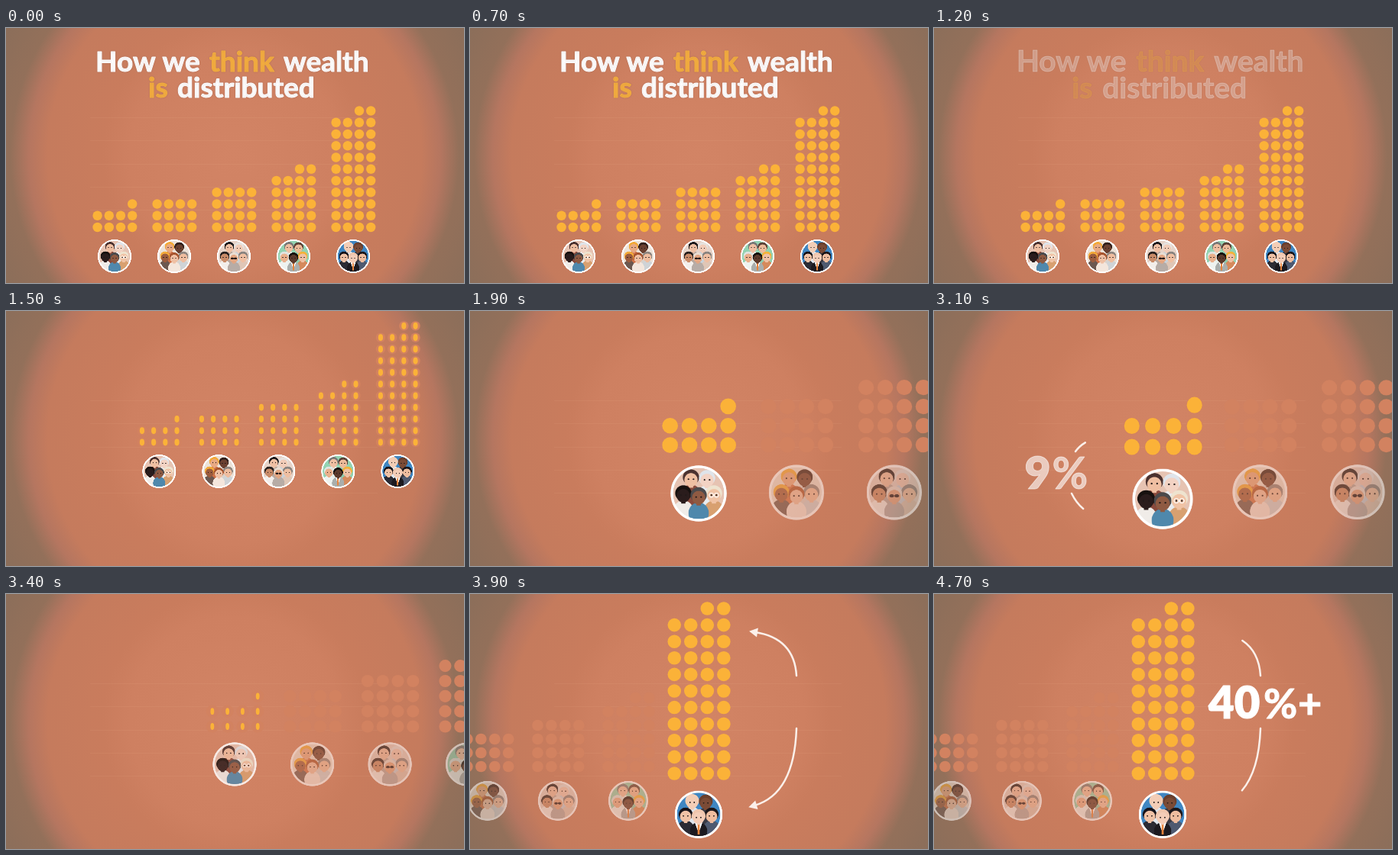
Write an HTML page with a canvas that moves like this. It is 599 px wide and 334 px high and loops after 4.8 s.

```html
<!DOCTYPE html>
<html lang="en">
<head>
<meta charset="utf-8">
<title>How we think wealth is distributed</title>
<style>
html, body { margin: 0; width: 100%; height: 100%; overflow: hidden; background: #8c6f5b; }
canvas { display: block; }
</style>
</head>
<body>
<canvas id="stage" width="599" height="334"></canvas>
<script>
const W = 599, H = 334, LOOP = 4800, STEP = 100;
const CX = 299, CY = 167;
const GOLD = '#fbb238', FADED = '#d28260';
const ctx = document.getElementById('stage').getContext('2d');

// Dots per column for each fifth of the population
const groups = [[2, 2, 2, 3], [3, 3, 3, 3], [4, 4, 4, 4], [5, 5, 6, 6], [10, 10, 11, 11]];

// Head places: two behind, one at each side, one in front
const seats = [[-6, -11.5], [6.6, -11], [-12, 1], [12, 1], [0, 2.5]];

// Background, then skin / hair / clothes / extra per seat
const crowds = [
  ['#e6c3b2',
    ['#efbfa2', '#4b3230', '#8a4a3c'], ['#f3d3c4', '#dfe4ea', '#e8ecf0'],
    ['#2a1c1c', '#17110f', '#f0ece8'], ['#f0c3a5', '#eee3cf', '#d8a070', 'glasses'],
    ['#8f5a42', '#4c4a4c', '#4f88ac']],
  ['#ece2d8',
    ['#e8a983', '#f2a93a', '#cf7148'], ['#6a4030', '#33211d', '#d9d2cc'],
    ['#9c5c3e', '#f2a93a', '#6c5850'], ['#efbd9f', '#8f8680', '#cfd3d6'],
    ['#efc0a4', '#a8552f', '#f4e6dc']],
  ['#e6d3c8',
    ['#efc0a4', '#1d1a1c', '#b8a9a0'], ['#f2ccb8', '#e6e2de', '#c9d2da'],
    ['#c98b68', '#29211f', '#f3eeea'], ['#efbfa2', '#8a8480', '#dfc6b6'],
    ['#e3a682', '#e9ddd2', '#b7aca6', 'shades']],
  ['#93d3b2',
    ['#efbfa2', '#7a7a78', '#e5efe9'], ['#edbb9a', '#5c4238', '#8ec9ac'],
    ['#e9b08c', '#dfe3e0', '#eef2ef'], ['#efc0a4', '#f2b23c', '#d58a5c'],
    ['#5b3a2c', '#17120f', '#a9aeac', 'suit']],
  ['#3f86c2',
    ['#f3cdb6', '#f3cdb6', '#dfe6ee'], ['#7b4b36', '#6a3f2d', '#3a3a44'],
    ['#f0c2a6', '#17131a', '#2b2b34'], ['#efbd9f', '#1c171b', '#4f5a70'],
    ['#f4cdb8', '#f0c6ae', '#1c1a20', 'suit']]
];

const clamp = v => Math.max(0, Math.min(1, v));
const ramp = (t, a, b) => clamp((t - a) / (b - a));
const smooth = p => p < .5 ? 2 * p * p : 1 - 2 * (1 - p) * (1 - p);
const ease = (t, a, b) => smooth(ramp(t, a, b));
const mix = (a, b, p) => a + (b - a) * p;

function oval(c, x, y, rx, ry, fill) {
  c.fillStyle = fill;
  c.beginPath();
  c.ellipse(x, y, rx, ry, 0, 0, 7);
  c.fill();
}

function person(c, x, y, [skin, hair, cloth, extra]) {
  oval(c, x, y + 13, 8, 8.5, cloth);
  if (extra === 'suit') {
    c.fillStyle = '#fff';
    c.beginPath();
    c.moveTo(x - 3.5, y + 5); c.lineTo(x + 3.5, y + 5); c.lineTo(x, y + 15);
    c.fill();
    c.fillStyle = '#e8843c';
    c.fillRect(x - 1, y + 6, 2, 10);
  }
  oval(c, x, y - 1.2, 6.4, 6.2, hair);
  c.fillStyle = skin;
  c.fillRect(x - 1.6, y + 3, 3.2, 4);
  oval(c, x, y + .8, 5.2, 5.3, skin);
  const eye = extra === 'shades' ? 1.9 : .65;
  for (const side of [-2, 2]) {
    oval(c, x + side, y + .3, eye, Math.min(eye, 1.3), '#221a1a');
    if (extra === 'glasses') {
      c.strokeStyle = '#fff';
      c.lineWidth = .6;
      c.beginPath();
      c.arc(x + side, y + .3, 1.7, 0, 7);
      c.stroke();
    }
  }
}

// Badges are drawn once at triple size, then placed as one layer
const badges = crowds.map(([back, ...people]) => {
  const layer = document.createElement('canvas');
  layer.width = layer.height = 144;
  const c = layer.getContext('2d');
  c.scale(3, 3);
  c.translate(24, 24);
  c.save();
  c.beginPath();
  c.arc(0, 0, 21, 0, 7);
  c.clip();
  c.fillStyle = back;
  c.fillRect(-24, -24, 48, 48);
  people.forEach((p, i) => person(c, ...seats[i], p));
  c.restore();
  c.strokeStyle = '#fff';
  c.lineWidth = 2;
  c.beginPath();
  c.arc(0, 0, 21, 0, 7);
  c.stroke();
  return layer;
});

function backdrop() {
  const g = ctx.createRadialGradient(CX, CY, 0, CX, CY, 345);
  const stops = [[0, '#d28465'], [.4, '#ce8061'], [.5, '#c97c5d'], [.71, '#c57b5d'],
    [.78, '#b57660'], [.85, '#93705a'], [1, '#8b6e5a']];
  for (const [at, color] of stops) g.addColorStop(at, color);
  ctx.fillStyle = g;
  ctx.fillRect(0, 0, W, H);
  ctx.fillStyle = 'rgba(255,205,170,.07)';
  for (let y = 117; y < 240; y += 30.3) ctx.fillRect(110, Math.round(y), 376, 1);
}

function write(str, x, y, size, color, weight = 700) {
  ctx.font = `${weight} ${size}px Lato, "Open Sans", sans-serif`;
  ctx.lineJoin = 'round';
  ctx.lineWidth = 1;
  ctx.fillStyle = ctx.strokeStyle = color;
  ctx.fillText(str, x, y);
  ctx.strokeText(str, x, y);
}

// Run draw() faded and scaled about a point
function layer(alpha, scale, x, y, draw) {
  if (alpha <= 0) return;
  ctx.save();
  ctx.globalAlpha = alpha;
  ctx.translate(x, y);
  ctx.scale(scale, scale);
  ctx.translate(-x, -y);
  draw();
  ctx.restore();
}

function title(t) {
  const out = ramp(t, 950, 1300);
  layer(1 - out, 1 + .07 * out, CX, 62, () => {
    ctx.shadowColor = 'rgba(120,80,80,.3)';
    ctx.shadowBlur = 2;
    write('How we', 117, 57, 37, '#fff');
    write('think', 266, 57, 37, '#f5ae3e');
    write('wealth', 363, 57, 37, '#fff');
    write('is', 186, 91, 37, '#f5ae3e');
    write('distributed', 224, 91, 37, '#fff');
  });
}

function camera(t) {
  const pan = ease(t, 3400, 3850);
  return {
    x: mix(mix(299, 142, ease(t, 1250, 1830)), 454, pan),
    y: mix(mix(132, 43, ease(t, 1200, 1500)), 88, pan),
    z: mix(mix(1, 1.64, ease(t, 1500, 1900)), 1.18, ease(t, 3050, 3600))
  };
}

function light(i, t) {
  const dim = 1 - ramp(t, 1200, 1800);
  if (i === 0) return Math.max(dim, ramp(t, 1500, 1900) * (1 - ramp(t, 3050, 3550)));
  return i === 4 ? Math.max(dim, ramp(t, 3650, 3850)) : dim;
}

function lift(i, t) {
  if (i === 0) return ease(t, 1850, 2100) * (1 - ease(t, 2950, 3250));
  return i === 4 ? ease(t, 3650, 3850) : 0;
}

function drawGroup(i, t, cam) {
  const lit = light(i, t), grow = 1 + .2 * lift(i, t);
  const s = cam.z * grow;
  const pivot = (i === 4 ? 76 : 55) * cam.z;
  const x = CX + cam.z * (142 + 78 * i - cam.x);
  const y = CY + cam.z * cam.y + pivot * (grow - 1);
  if (x < -60 || x > W + 60) return;
  const r = 6.2 * s;
  groups[i].forEach((count, col) => {
    for (let row = 0; row < count; row++) {
      const dx = x + (col - 1.5) * 15.2 * s + .4 * s;
      const dy = y - (38 + row * 15.25) * s;
      if (lit < 1) oval(ctx, dx, dy, r, r, FADED);
      if (lit > 0) oval(ctx, dx, dy, r * lit, r * Math.sqrt(lit), GOLD);
    }
  });
  ctx.globalAlpha = .55 + .45 * Math.min(1, 2 * lit);
  ctx.drawImage(badges[i], x - 24 * s, y - 24 * s, 48 * s, 48 * s);
  ctx.globalAlpha = 1;
}

// Quadratic arrow drawn up to fraction p; the head comes with the last part
function arrow(x0, y0, cx, cy, x1, y1, p) {
  if (p <= 0) return;
  const at = (a, b, c, u) => mix(mix(a, b, u), mix(b, c, u), u);
  ctx.strokeStyle = ctx.fillStyle = '#fbf0ea';
  ctx.lineWidth = 2.5;
  ctx.lineCap = 'round';
  ctx.beginPath();
  ctx.moveTo(x0, y0);
  ctx.quadraticCurveTo(mix(x0, cx, p), mix(y0, cy, p), at(x0, cx, x1, p), at(y0, cy, y1, p));
  ctx.stroke();
  if (p < .95) return;
  ctx.save();
  ctx.translate(x1, y1);
  ctx.rotate(Math.atan2(y1 - cy, x1 - cx));
  ctx.beginPath();
  ctx.moveTo(8, 0); ctx.lineTo(-3, -6); ctx.lineTo(-3, 6);
  ctx.fill();
  ctx.restore();
}

function lowShare(t) {
  const p = ramp(t, 2100, 2400) - ramp(t, 2950, 3200);
  arrow(185, 184, 198, 166, 226, 165, p);
  arrow(180, 239, 195, 270, 230, 271, p);
  const show = ease(t, 2200, 2500) - ramp(t, 3000, 3250);
  layer(show, mix(.8, 1, show), 160, 212, () => {
    write('9', 115, 235, 64, '#fff', 900);
    write('%', 154, 235, 62, '#fff');
  });
}

function highShare(t) {
  const p = ramp(t, 3700, 3900) - ramp(t, 4600, 4880);
  arrow(427, 107, 424, 58, 373, 50, p);
  arrow(427, 176, 424, 262, 372, 277, p);
  const show = ease(t, 3950, 4250);
  layer(show, mix(.8, 1, show), 433, 143, () => {
    write('40', 359, 163, 58, '#fff', 900);
    write('%', 431, 163, 54, '#fff');
    write('+', 476, 163, 54, '#fff');
  });
}

function render(t) {
  backdrop();
  title(t);
  const cam = camera(t);
  groups.forEach((_, i) => drawGroup(i, t, cam));
  lowShare(t);
  highShare(t);
}

const start = performance.now();
function tick() {
  const t = (performance.now() - start) % LOOP;
  render(Math.floor(t / STEP) * STEP);
  requestAnimationFrame(tick);
}
tick();
</script>
</body>
</html>
```
